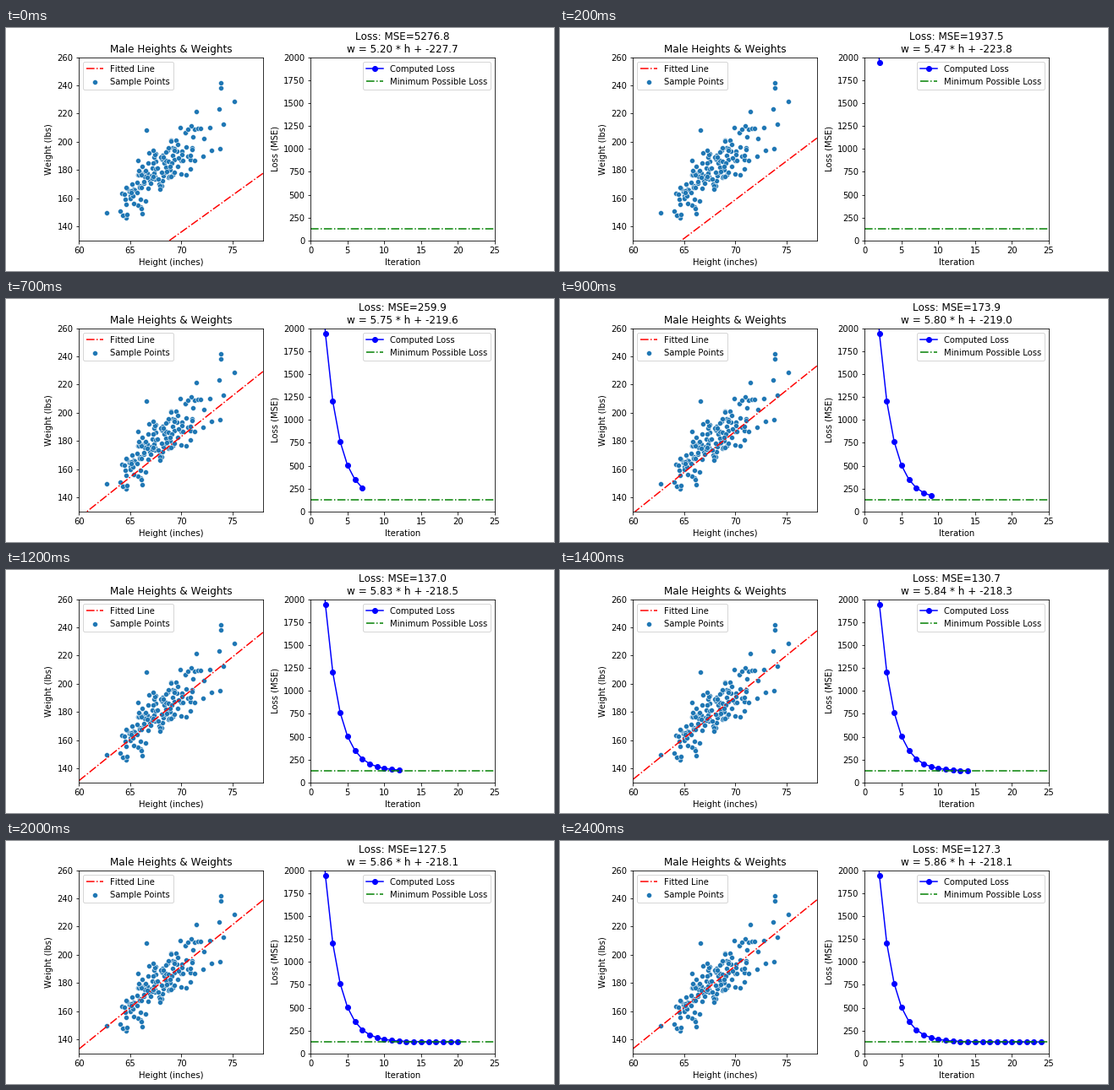
A matplotlib script for the animation above (2.5 s loop, 648 px wide and 288 px high).

```python
import matplotlib.pyplot as plt
import numpy as np
from matplotlib.animation import FuncAnimation

STEPS = 25
RATE = 0.261361  # decay of the fit error per iteration
MIN_LOSS = 127.31

plt.rcParams.update({
    "font.family": "DejaVu Sans",
    "font.size": 10,
    "text.kerning_factor": 6,  # whole-pixel kerning
})


def fit(k):
    """Slope and intercept after k descent steps."""
    done = 1 - np.exp(-RATE * k)
    return 5.197 + 0.664 * done, -227.7 + 9.65 * done


def loss(k):
    return MIN_LOSS + 5149.49 * np.exp(-2 * RATE * k)


def sample_points(n=138, seed=11):
    """Seeded cloud around the best fit, plus a few extreme samples."""
    rng = np.random.default_rng(seed)
    slope, offset = fit(STEPS)
    h = rng.triangular(63.3, 68.2, 73.2, n)
    w = slope * h + offset + rng.triangular(-22, 0, 24, n)
    extremes = [(62.7, 149.7), (64.05, 150.9), (66.2, 149), (66.6, 208.2),
                (73.8, 195.2), (73.7, 223), (73.85, 238.2), (73.9, 241.8),
                (74.1, 212.6), (75.2, 228.6)]
    return np.vstack([extremes, np.column_stack([h, w])]).T


def style(ax, xlabel, ylabel, xlim, ylim, xstep, ystep):
    ax.set(xlabel=xlabel, ylabel=ylabel, xlim=xlim, ylim=ylim)
    ax.set_xticks(np.arange(xlim[0], xlim[1] + 1, xstep))
    ax.set_yticks(np.arange(-(-ylim[0] // ystep) * ystep, ylim[1] + 1, ystep))
    ax.set_box_aspect(1)


fig, (left, right) = plt.subplots(1, 2, figsize=(9, 4), dpi=72)
fig.subplots_adjust(left=0.125, right=0.9, bottom=0.125, top=0.88, wspace=0.2)

line, = left.plot([], [], "r-.", label="Fitted Line")
left.scatter(*sample_points(), s=36, color="C0", edgecolors="white",
             linewidths=0.5, label="Sample Points")
style(left, "Height (inches)", "Weight (lbs)", (60, 78), (130, 260), 5, 20)
left.set_title("Male Heights & Weights")
left.legend(loc="upper left")

curve, = right.plot([], [], "b-o", label="Computed Loss")
right.plot([0, 25], [MIN_LOSS] * 2, "g-.", label="Minimum Possible Loss")
style(right, "Iteration", "Loss (MSE)", (0, 25), (0, 2000), 5, 250)
title = right.set_title("")
right.legend(loc="upper right")

heights = np.array([60, 78])


def update(k):
    slope, offset = fit(k)
    steps = np.arange(k + 1)
    line.set_data(heights, slope * heights + offset)
    curve.set_data(steps, loss(steps))
    title.set_text(f"Loss: MSE={loss(k):.1f}\nw = {slope:.2f} * h + {offset:.1f}")
    return line, curve, title


anim = FuncAnimation(fig, update, frames=STEPS, interval=100, repeat=True)
plt.show()
```
